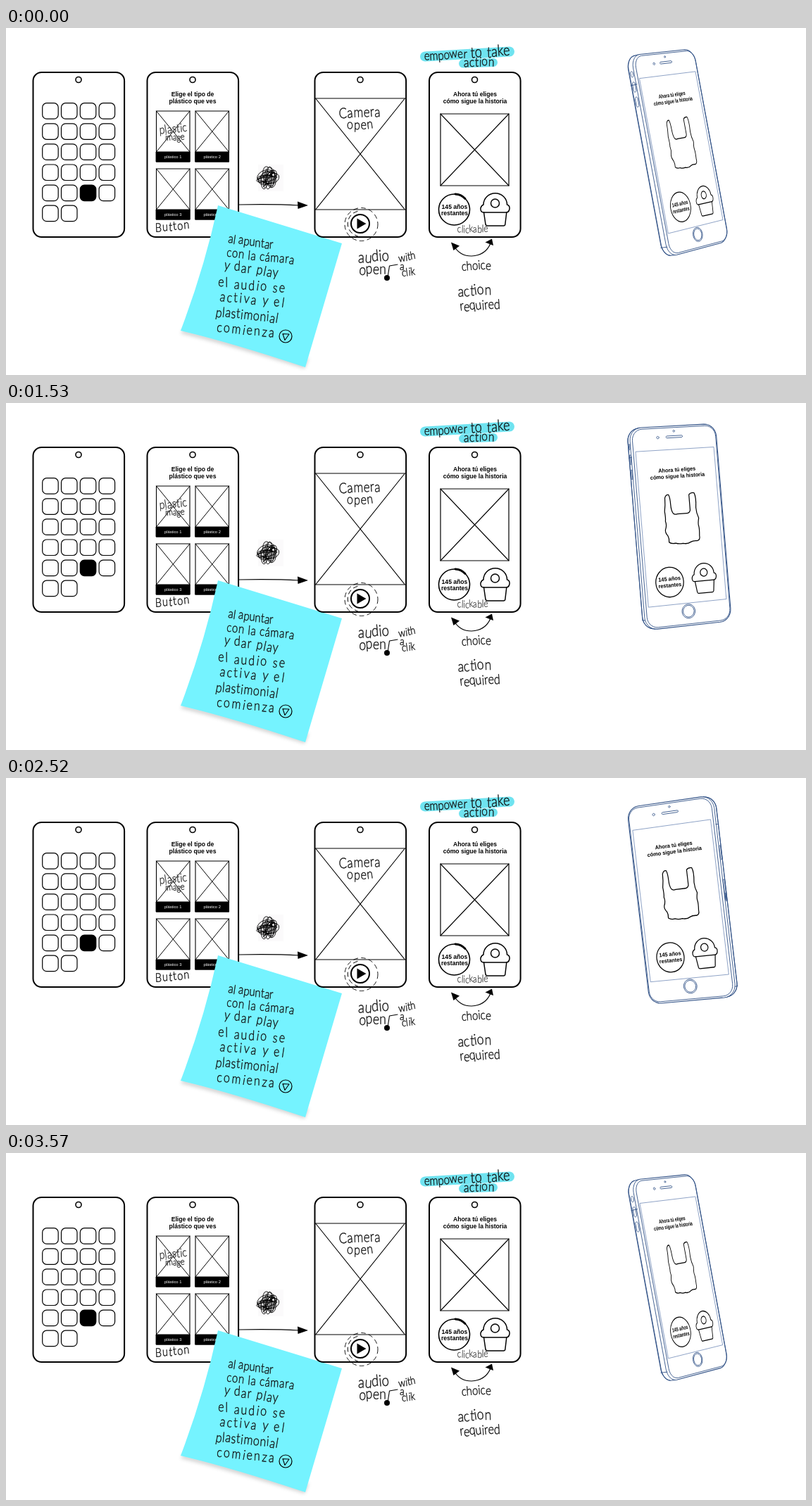
An HTML page that plays this animation: 1136x493 px, repeating every 3.6 s.

```html
<!DOCTYPE html>
<html lang="es">
<head>
<meta charset="utf-8">
<title>Wireframe flow</title>
<style>
  html, body { margin: 0; width: 100%; height: 100%; overflow: hidden; background: #fff; }
  svg { display: block; width: 100vw; height: 100vh; }
  text { font-family: "Liberation Sans", Arial, sans-serif; }
  .b { font-weight: 700; text-anchor: middle; }
  .hand { font-family: Lato, sans-serif; font-weight: 300; stroke-width: 0.35; }
</style>
</head>
<body>
<svg id="stage" viewBox="0 0 1136 493" fill="none" stroke-linejoin="round" stroke-linecap="round">
  <defs><filter id="soft" x="-20%" y="-20%" width="140%" height="140%"><feGaussianBlur stdDeviation="2.5"/></filter></defs>
  <g id="board"></g>
  <g id="device">
    <path id="body" fill="#fff" stroke="#345488" stroke-width="1.1"/>
    <path id="lines" stroke="#345488" stroke-width="0.9"/>
    <path id="screen" stroke="#5f7cae" stroke-width="0.7"/>
    <g id="content"></g>
  </g>
</svg>
<script>
const $ = id => document.getElementById(id);
const { sin, cos, PI, max, min, floor } = Math;

// ---------- static board ----------
const rect = (x, y, w, h, r, sw, fill = 'none') =>
  `<rect x="${x}" y="${y}" width="${w}" height="${h}" rx="${r}" fill="${fill}" stroke="#000" stroke-width="${sw}"/>`;
const ring = (x, y, r, sw, extra = '') =>
  `<circle cx="${x}" cy="${y}" r="${r}" stroke="#000" stroke-width="${sw}" ${extra}/>`;
const path = (d, sw, extra = '') => `<path d="${d}" stroke="#000" stroke-width="${sw}" ${extra}/>`;
const solid = d => `<path d="${d}" fill="#000"/>`;
const bold = (s, x, y, size = 8.6) => `<text class="b" x="${x}" y="${y}" font-size="${size}" fill="#000">${s}</text>`;
const cross = (x, y, w, h, sw) => path(`M${x} ${y}l${w} ${h}m0 ${-h}l${-w} ${h}`, sw);

let seed = 7;
const rand = () => (seed = seed * 16807 % 2147483647) / 2147483647;

// Handwritten line: tall light text with a small wobble per letter
function hand(s, x, y, size, angle = 0, gap = 0, color = '#111') {
  let prev = 0;
  const dy = [], rot = [];
  for (const c of s) {
    const off = (rand() - 0.5) * size * 0.1;
    dy.push((off - prev).toFixed(2));
    rot.push(((rand() - 0.5) * 12).toFixed(1));
    prev = off;
  }
  return `<text class="hand" transform="translate(${x} ${y}) rotate(${angle}) scale(1 1.2)" font-size="${size}" ` +
    `letter-spacing="${gap}" dy="${dy.join(' ')}" rotate="${rot.join(' ')}" fill="${color}" stroke="${color}">${s}</text>`;
}

const frame = x => rect(x + 0.5, 63, 129.6, 234, 12, 2) + ring(x + 65, 73.5, 4, 1.6);

function muffin(x, y, k, sw) {
  return `<g transform="translate(${x} ${y}) scale(${k})">` +
    path('M-16 4q-5 0 -4.500 -6q1 -4 4 -5A16.500 16 0 0 1 17 -7q4 1 3.500 6q-1 5 -4.500 5z', sw) +
    path('M-16 4l2.500 17q.5 2 2.500 2h23q2 0 2.300 -2l2 -17', sw) + ring(0, -9, 6, sw) + '</g>';
}

function apps() {
  let s = '';
  for (let i = 0; i < 22; i++)
    s += rect(51.7 + i % 4 * 26.8, 106.7 + floor(i / 4) * 29.1, 22.5, 22.5, 6, 1.2, i === 18 ? '#000' : 'none');
  return s;
}

function cards() {
  let s = '';
  for (let i = 0; i < 4; i++) {
    const x = 213.5 + i % 2 * 55.5, y = 118 + floor(i / 2) * 82;
    s += rect(x, y, 47.5, 72, 0, 1.1) + cross(x, y, 47.5, 58, 1) + rect(x, y + 58, 47.5, 14, 0, 1, '#000') +
      `<text x="${x + 23.7}" y="${y + 67}" font-size="5.8" text-anchor="middle" fill="#fff">plástico ${i + 1}</text>`;
  }
  return s;
}

// Ball of slowly turning ellipses
function scribble() {
  let d = '';
  for (let i = 0; i < 230; i++) {
    const u = i * 0.4, turn = 2.2 + 0.9 * sin(u * 0.19), a = 13 * cos(u), b = (5 + 3 * sin(u * 0.37)) * sin(u);
    const x = 372 + a * cos(turn) - b * sin(turn) + 3.5 * sin(u * 0.23 + 1);
    const y = 213 + a * sin(turn) + b * cos(turn) + 3.5 * cos(u * 0.31);
    d += (i ? 'L' : 'M') + x.toFixed(1) + ' ' + y.toFixed(1);
  }
  return '<rect x="358" y="194" width="36" height="38" fill="#fbfafb"/>' + path(d, 0.9);
}

const note = [
  ['al apuntar', 315, 305, 15, 8, 0],
  ['con la cámara', 313, 325, 15, 6, 0.65],
  ['y dar play', 309, 343, 16, 8, 1.3],
  ['el audio se', 301, 368, 16, 5, 2.1],
  ['activa y el', 303, 388, 16, 5, 2.4],
  ['plastimonial', 297, 409, 16, 6, 0.7],
  ['comienza', 299, 431, 16, 6, 2.4]
];

$('board').innerHTML =
  frame(38) + apps() +
  frame(200) + bold('Elige el tipo de', 265, 97) + bold('plástico que ves', 265, 107) + cards() +
  hand('plastic', 218, 151, 14, -7, 0.3, '#333') + hand('image', 226, 160, 11, -2, 0, '#333') +
  hand('Button', 212, 289, 14.5, -4, 1.2) +
  scribble() + path('M331 251Q380 250 416 252', 1.1) + solid('M414 246.500L429 252L414.500 257Z') +
  // sticky note
  '<path d="M252 428L248 434Q300 446 424 484L430 470Z" fill="#777" opacity=".3" filter="url(#soft)"/>' +
  '<path d="M301 252L477 306L425 482Q320 447 248 430Q282 340 301 252Z" fill="#75f3ff"/>' +
  note.map(a => hand(...a)).join('') +
  ring(397, 438, 9, 1.2) + path('M393 434.500L402 435L396 443.500Z', 1.1) +
  // camera view
  frame(438) + path('M439 100h128M439 258h128', 1.2) + cross(440, 100.5, 126, 157, 1.1) +
  hand('Camera', 473, 128, 17, -2, 0.5) + hand('open', 484, 144, 16, -3, 1) +
  ring(503, 278, 13, 2, 'fill="#fff"') + solid('M498.500 270.500L511.500 278L498.500 285.500Z') +
  path('M499 260.500A18 18 0 0 0 499 295.500', 1, 'stroke-dasharray="6 5"') +
  ring(504.5, 279, 23.5, 0.9, 'stroke-dasharray="6 5"') +
  hand('audio', 500, 333, 18.5, -1, 0.2) + hand('open', 501, 350, 17.5, 0, 0.2) +
  hand('with', 558, 332, 13, -8) + hand('a', 559, 343, 13) + hand('clik', 562, 353, 13, -4, 0.5) +
  path('M542 354L544.500 338L556 336', 1.1) + '<circle cx="541" cy="355" r="4" fill="#000"/>' +
  // choice view
  '<path d="M595 40.500L715 33.500" stroke="#6fe3f0" stroke-width="14"/><path d="M649 50.500L692 49" stroke="#6fe3f0" stroke-width="12"/>' +
  hand('empower', 594, 46, 15, -3) + hand('to', 660, 42, 18, -6) + hand('take', 683, 41, 18, -4, 0.2) +
  hand('action', 650, 55, 15.5, -3, 0.5) +
  frame(600.5) + bold('Ahora tú eliges', 666, 97) + bold('cómo sigue la historia', 666, 107) +
  rect(617, 122, 97, 102, 0, 1.2) + cross(617, 122, 97, 102, 1.1) +
  ring(636.5, 258, 22, 1.6) + path('M638 236Q646 236 652 242.500', 2.8) +
  bold('145 años', 637, 257) + bold('restantes', 637, 266) + muffin(694.5, 258, 1, 1.5) +
  hand('clickable', 641, 291, 12, -2, 0, '#555') +
  path('M637 311Q645 324 661 324Q681 323 688 306', 1.2) +
  solid('M632 304.500L644 309.500L635.500 316Z') + solid('M690 299.500L692 309L680.500 304.500Z') +
  hand('choice', 647, 344, 15, -2) + hand('action', 642, 382, 17.5, -5, 0.3) + hand('required', 645, 402, 16, -4);

// ---------- turning phone ----------
const bag = 'M-22 -31q2 -5 6 -4q2 4 2 14q0 9 3 13q2 2 6 1l15 0q4 0 5 -4q0 -12 0 -22q3 -3 8 -2q3 6 1 21' +
  'q0 8 3 15q-2 8 -1 11q1 4 0 14q1 6 -4 7q-6 -1 -10 1q-5 3 -12 1q-6 1 -11 -1q-6 1 -10 -2q1 -5 -1 -9' +
  'q-4 -5 -3 -9q3 -6 1 -12q1 -4 0 -14q2 -9 2 -19z';
const items = [
  [0, -73, bold('Ahora tú eliges', 0, -4, 7.9) + bold('cómo sigue la historia', 0, 5, 7.9)],
  [0, -10, path(bag, 1.3)],
  [-25, 78, ring(0, 0, 21, 1.3) + bold('145 años', 0, -2, 7.9) + bold('restantes', 0, 7, 7.9)],
  [28, 77, muffin(0, 0, 0.91, 1.4)]
];
$('content').innerHTML = items.map(i => `<g>${i[2]}</g>`).join('');
const groups = [...$('content').children];

const HW = 66, HH = 142, DEPTH = 2000;
const mix = (a, b, k) => a + (b - a) * k;
const smooth = k => (k = min(1, max(0, k)), k * k * (3 - 2 * k));

function pose(t) {
  const turn = 2250;
  if (t < turn) {
    const k = t / turn;
    return { yaw: mix(48, 9.5, k), roll: mix(10.5, 2, k), cx: mix(955, 957.5, k) };
  }
  const k = (1 - cos(PI * (t - turn) / (3600 - turn))) / 2, lean = smooth((t - turn) / 500);
  return {
    yaw: mix(9.5, -312, k),
    roll: mix(2, 10.4, lean),
    cx: mix(957.5, 962, lean) - 7 * smooth((t - 2900) / 700)
  };
}

// Outline of the case with outward normals
function outline(inset, z) {
  const pts = [], r = 18 - inset;
  for (let q = 0; q < 4; q++)
    for (let i = 0; i <= 7; i++) {
      const a = (q + i / 7) * PI / 2, nx = cos(a), ny = sin(a);
      const sx = q === 0 || q === 3 ? 1 : -1, sy = q < 2 ? 1 : -1;
      pts.push({ p: [sx * (HW - 18) + r * nx, sy * (HH - 18) + r * ny, z], nx });
    }
  return pts;
}
const layers = [outline(2.5, 7.5), outline(0, 4.5), outline(0, -4.5), outline(2.5, -7.5)];

function hull(pts) {
  pts.sort((a, b) => a[0] - b[0] || a[1] - b[1]);
  const half = list => {
    const h = [];
    for (const p of list) {
      while (h.length > 1) {
        const [a, b] = h.slice(-2);
        if ((b[0] - a[0]) * (p[1] - a[1]) - (b[1] - a[1]) * (p[0] - a[0]) > 0) break;
        h.pop();
      }
      h.push(p);
    }
    return h.slice(0, -1);
  };
  return half(pts).concat(half([...pts].reverse()));
}

const join = (pts, close) => 'M' + pts.map(p => p[0].toFixed(2) + ' ' + p[1].toFixed(2)).join('L') + (close ? 'Z' : '');

// Pill around (u, v): half sizes a, b
function pill(u, v, a, b) {
  const r = min(a, b), out = [];
  for (let i = 0; i < 24; i++) {
    const g = (i + 0.5) * PI / 12, c = cos(g), s = sin(g);
    out.push([u + Math.sign(c) * (a - r) + r * c, v + Math.sign(s) * (b - r) + r * s]);
  }
  return out;
}

function draw(t) {
  const { yaw, roll, cx } = pose(t);
  const ya = yaw * PI / 180, ro = roll * PI / 180;
  const cy = cos(ya), sy = sin(ya), cr = cos(ro), sr = sin(ro);
  const project = ([x, y, z]) => {
    const X = x * cy + z * sy, s = DEPTH / (DEPTH + x * sy - z * cy);
    return [cx + (X * cr + y * sr) * s, 174.5 + (y * cr - X * sr) * s];
  };
  const loop = pts => join(pts.map(project), true);
  const line = pts => join(pts.map(project));
  const onFace = (z, shape) => loop(shape.map(([x, y]) => [x, y, z]));

  $('body').setAttribute('d', join(hull(layers.flat().map(o => project(o.p))), true));

  let d = '';
  // rims on the side that faces the viewer
  for (const l of [layers[1], layers[2]]) {
    const seen = l.filter(o => -o.nx * sy > 0.05).map(o => o.p);
    if (seen.length) {
      const right = seen[0][0] > 0;
      seen.sort((a, b) => a[1] - b[1] || (right ? a[0] - b[0] : b[0] - a[0]));
      d += line(seen);
    }
  }
  const side = sy > 0 ? -HW : HW;
  const onSide = shape => loop(shape.map(([z, y]) => [side, y, z]));
  if (Math.abs(sy) > 0.12) {
    for (const y of [-101, 128]) d += line([[side, y, -6], [side, y, 6]]);
    if (sy > 0)
      d += onSide(pill(0, -116, 2.2, 4)) + onSide(pill(0, -98, 2.4, 7)) + onSide(pill(0, -77, 2.4, 7));
    else
      d += onSide(pill(0, -61, 3, 10)) + onSide(pill(0, -8, 3, 15.5)) + onSide(pill(0, 1, 1.3, 5));
  }
  const front = cy > 0.01;
  if (front) {
    d += loop(layers[0].map(o => o.p)) + onFace(7, pill(0, -126.5, 12.5, 1.4)) + onFace(7, pill(0, -134.5, 1.3, 1.3)) +
      onFace(7, pill(-25, -126.5, 1.7, 1.7)) + onFace(7, pill(0, 121.5, 10, 10)) + onFace(7, pill(0, 121.5, 8.3, 8.3));
  } else if (cy < -0.01) {
    d += loop(layers[3].map(o => o.p)) + onFace(-7, pill(42, -122, 16, 8)) +
      onFace(-7, pill(50, -122, 5.5, 5.5)) + onFace(-7, pill(34, -122, 5.5, 5.5));
  }
  $('lines').setAttribute('d', d);
  $('screen').setAttribute('d', front ? onFace(7, [[-59.5, -108.5], [59.5, -108.5], [59.5, 110], [-59.5, 110]]) : '');

  $('content').style.display = front ? '' : 'none';
  items.forEach(([x, y], i) => {
    const o = project([x, y, 7]), a = project([x + 1, y, 7]), b = project([x, y + 1, 7]);
    groups[i].setAttribute('transform',
      `matrix(${a[0] - o[0]} ${a[1] - o[1]} ${b[0] - o[0]} ${b[1] - o[1]} ${o[0]} ${o[1]})`);
  });
}

const start = performance.now();
function tick(now) {
  const t = max(0, now - start) % 3600;
  draw(floor(t / 30) * 30);
  requestAnimationFrame(tick);
}
draw(0);
requestAnimationFrame(tick);
</script>
</body>
</html>
```
